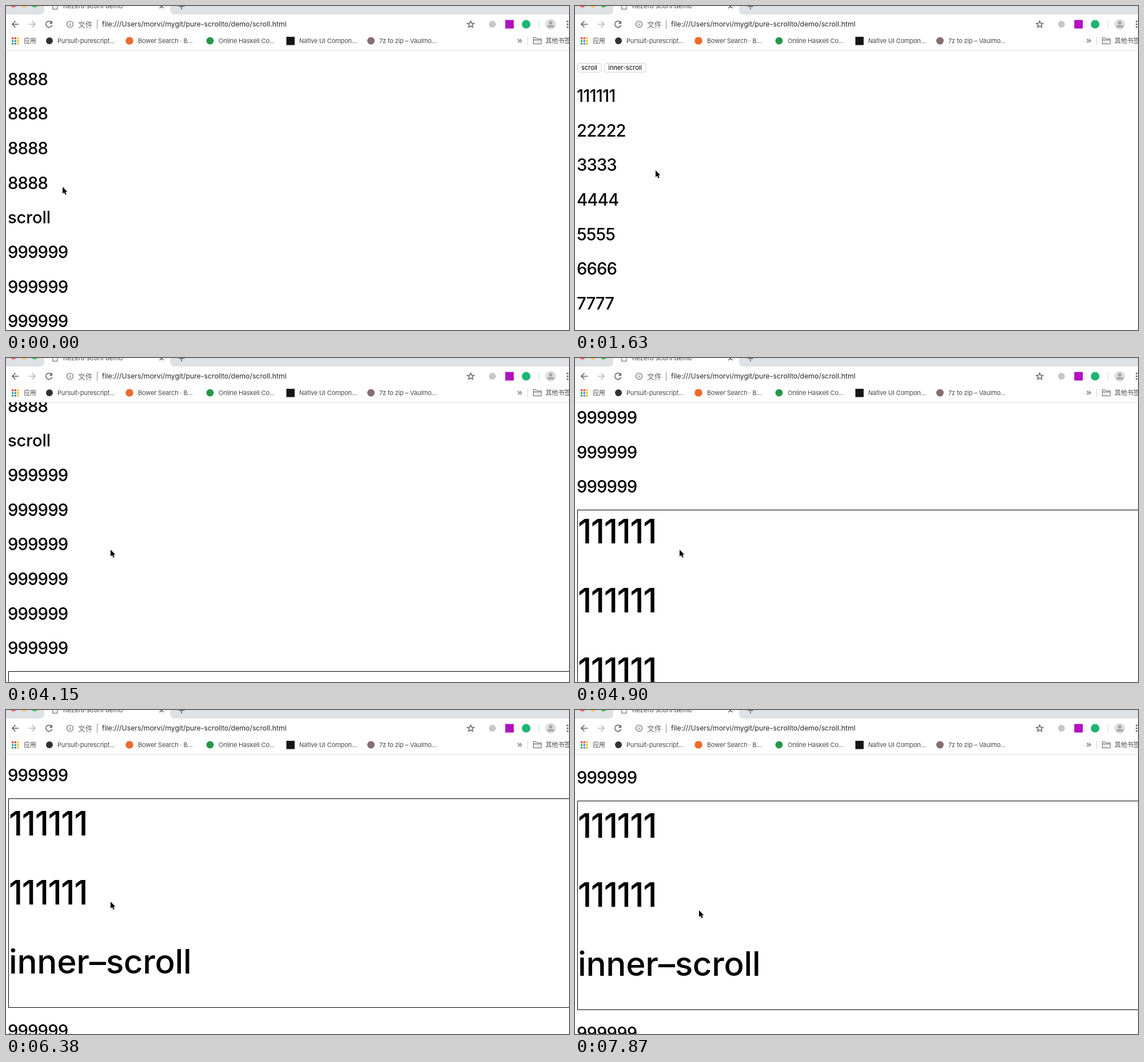
These frames come from a looping animation (985 by 568 pixels, 8000 ms). An HTML page:

```html
<!DOCTYPE html>
<html lang="zh">
<head>
<meta charset="utf-8">
<title>Scroll demo</title>
<style>
  html, body { margin: 0; width: 100%; height: 100%; overflow: hidden; background: #fff; }
  svg { display: block; font-family: Inter, "Noto Sans CJK SC", "Noto Sans CJK", sans-serif; }
  .row { font-size: 29.2px; font-weight: 550; letter-spacing: -.029em; }
  .inner { font-size: 58.4px; font-weight: 550; letter-spacing: -.024em; }
  .word { letter-spacing: -.004em; }
  .button { font-size: 11px; text-anchor: middle; }
  .mark { font-size: 11px; letter-spacing: -.015em; fill: #46494d; }
  .line { fill: none; stroke: #5f6368; stroke-width: 1.6; }
  .thin { fill: none; stroke: #5f6368; stroke-width: 1.2; }
</style>
</head>
<body>
<svg width="985" height="568" viewBox="0 0 985 568">
  <g id="page">
    <g id="buttons" fill="#fff" stroke="#d0d0d0">
      <rect x="4.5" y="100.5" width="41.5" height="15.5" rx="3"/>
      <rect x="51.5" y="100.5" width="72.5" height="15.5" rx="3"/>
    </g>
    <text class="button" x="25" y="112">scroll</text>
    <text class="button" x="87.7" y="112">inner-scroll</text>
    <g id="rows"></g>
    <rect x="4.5" y="1229.5" width="1000" height="366" fill="none" stroke="#000"/>
    <svg x="5" y="1230" width="995" height="365">
      <g id="inner">
        <rect id="selection" height="81" fill="#b4d5fe"/>
      </g>
    </svg>
  </g>

  <g id="browser">
    <rect width="985" height="78" fill="#fff"/>
    <rect width="985" height="15" fill="#dee1e6"/>
    <path d="M59 15q8 0 8-8V-5H287V7q0 8 8 8z" fill="#fff"/>
    <circle cx="13" cy="-3.5" r="6" fill="#fc5753"/>
    <circle cx="31.5" cy="-3.5" r="6" fill="#fdbc40"/>
    <circle cx="50" cy="-3.5" r="6" fill="#33c748"/>
    <path class="thin" d="M82-6V5.5h8V-6"/>
    <text x="100" y="4" font-size="11.5" fill="#46494d">Rezero scorll demo</text>
    <path class="line" d="M268.5-3l7 7M275.5-3l-7 7M301.5 .5h11M307-5V6"/>

    <path class="line" d="M22 32H11M16.5 26.5L11 32l5.5 5.5"/>
    <path class="line" d="M40 32H51M45.5 26.5L51 32l-5.5 5.5" style="stroke:#babcbe"/>
    <path class="line" d="M79.5 28.5A5.5 5.5 0 1 0 80.5 33.5"/>
    <path d="M81 25.5v5.5h-5.5z" fill="#5f6368"/>
    <circle class="thin" cx="112" cy="32" r="5.5"/>
    <path class="thin" d="M112 31v4M112 28.5v1.3"/>
    <text x="126" y="36.5" font-size="12.8" fill="#5f6368">文件</text>
    <path d="M159.5 24v16" stroke="#8b8e92"/>
    <text x="168" y="36.3" font-size="12.3" fill="#27292c">file:///Users/morvi/mygit/pure-scrollto/demo/scroll.html</text>
    <path id="star" class="thin" style="stroke-width:1.4"/>
    <circle cx="851" cy="32" r="6" fill="#c4c6c8"/>
    <rect x="873.5" y="24.5" width="15" height="15" fill="#b010c0"/>
    <circle cx="910" cy="32" r="7.5" fill="#1fb573"/>
    <path d="M932.5 24v16M912.5 54v14" stroke="#d5d7da"/>
    <circle cx="953" cy="32" r="9.3" fill="#dadce0"/>
    <circle cx="953" cy="29.5" r="3" fill="#a3a6aa"/>
    <path d="M947 37.5v-1q0-3 6-3t6 3v1z" fill="#a3a6aa"/>
    <g fill="#5f6368">
      <circle cx="982.5" cy="27" r="1.6"/><circle cx="982.5" cy="32" r="1.6"/><circle cx="982.5" cy="37" r="1.6"/>
    </g>

    <g id="apps"></g>
    <circle cx="76" cy="61" r="6" fill="#333"/>
    <circle cx="216" cy="61" r="6.8" fill="#ee6b2d"/>
    <circle cx="357" cy="61" r="6.5" fill="#24994c"/>
    <rect x="490.5" y="54" width="14.5" height="14.5" fill="#151515"/>
    <circle cx="638.5" cy="61" r="6.5" fill="#85706f"/>
    <g id="marks"></g>
    <path class="thin" d="M895.5 58l3 3-3 3M899 58l3 3-3 3"/>
    <path d="M922.5 66.5v-11h5l2 2h7v9zM922.5 59.5h14" fill="#e8e8e8" stroke="#6a6d71"/>
    <path d="M0 77.5h985" stroke="#dcdee0"/>
  </g>

  <g id="pointer">
    <path id="arrow" d="M0 0V12l2.700-2.500 2 4.500 2-.9-1.900-4.300H8.300z" stroke="#fff" stroke-width="1.2" paint-order="stroke"/>
    <path id="beam" d="M-3-8q3 0 3 2V6q0 2-3 2M3-8q-3 0-3 2M3 8q-3 0-3-2" fill="none" stroke="#222" stroke-width="1.2"/>
  </g>
</svg>
<script>
const $ = id => document.getElementById(id);
const add = (id, markup) => $(id).insertAdjacentHTML('beforeend', markup);
const text = (cls, x, y, s) => `<text class="${cls}" x="${x}" y="${y}">${s}</text>`;
const heading = (cls, x, y, s) => text(isNaN(s) ? cls + ' word' : cls, x, y, s);

const PITCH = 60.67, INNER_ROWS = 7;
const rows = ['111111', '22222', '3333', '4444', '5555', '6666', '7777',
  ...Array(4).fill('8888'), 'scroll', ...Array(6).fill('999999')];
rows.forEach((s, i) => add('rows', heading('row', 3, 168 + PITCH * i, s)));
add('rows', heading('row', 3, 1646.5, '999999'));

const innerBaseline = i => 101 + 2 * PITCH * i;
for (let i = 0; i <= INNER_ROWS; i++)
  add('inner', heading('inner', 0, innerBaseline(i), i < INNER_ROWS ? '111111' : 'inner–scroll'));
const innerEnd = innerBaseline(INNER_ROWS) - 306.5;
$('selection').setAttribute('y', innerBaseline(INNER_ROWS) - 62);

const colors = ['#ea4335', '#ea4335', '#fbbc05', '#34a853', '#4285f4', '#fbbc05', '#34a853', '#4285f4', '#fbbc05'];
colors.forEach((c, i) => add('apps',
  `<rect x="${10 + i % 3 * 4.7}" y="${55 + (i / 3 | 0) * 4.7}" width="3.2" height="3.2" fill="${c}"/>`));
[[31, '应用'], [90, 'Pursuit-purescript...'], [231, 'Bower Search · B...'], [372, 'Online Haskell Co...'],
  [513, 'Native UI Compon...'], [653, '7z to zip – Vaulmo...'], [944, '其他书签']]
  .forEach(([x, s]) => add('marks', text('mark', x, 65, s)));

const starPoints = Array.from({ length: 10 }, (_, i) => {
  const r = i % 2 ? 2.7 : 6.3, a = i * Math.PI / 5;
  return `${813 + r * Math.sin(a)} ${32.4 - r * Math.cos(a)}`;
});
$('star').setAttribute('d', `M${starPoints.join('L')}z`);

const LOOP = 8000, LAST_TICK = 53, SHORT_TICKS = [3, 7, 24, 25, 26, 35, 41, 50];
function tickAt(time) {
  let tick = 0;
  while (tick < LAST_TICK && (time -= SHORT_TICKS.includes(tick) ? 140 : 150) >= 0) tick++;
  return tick;
}

// Keys are [tick, value, ...], joined by straight lines.
const scrollKeys = [[0, 454], [6, 454], [7, 410], [9, 90], [10, -8], [11, 0], [12, 6], [14, 10], [18, 10],
  [19, 483], [20, 454], [26, 454], [27, 520], [28, 680], [29, 963], [39, 963],
  [40, 1076], [41, 1081], [43, 1074], [46, 1070]];
const innerKeys = [[30, 0], [32, 70], [37, innerEnd - 102], [38, innerEnd]];
const pointerKeys = [[0, 99, 317], [2, 45, 358], [3, 45, 358], [6, 145, 289], [10, 145, 289], [11, 141, 288],
  [17, 22, 97], [21, 22, 97], [27, 183, 336], [43, 183, 336], [46, 322, 440], [47, 322, 440],
  [50, 8, 440], [51, 8, 440], [53, 217, 351]];

function sample(keys, tick) {
  const next = keys.findIndex(k => k[0] >= tick);
  if (next < 0) return keys.at(-1).slice(1);
  if (next === 0) return keys[0].slice(1);
  const [a, b] = [keys[next - 1], keys[next]];
  const f = (tick - a[0]) / (b[0] - a[0]);
  return a.slice(1).map((v, i) => v + (b[i + 1] - v) * f);
}

const move = (id, x, y) => $(id).setAttribute('transform', `translate(${x} ${y})`);
const show = (id, on) => $(id).setAttribute('visibility', on ? 'visible' : 'hidden');

function draw(now) {
  const tick = tickAt(now % LOOP);
  const [x, y] = sample(pointerKeys, tick);
  move('page', 0, -Math.round(sample(scrollKeys, tick)[0]));
  move('inner', 0, -sample(innerKeys, tick)[0]);
  move('pointer', Math.round(x), Math.round(y));

  const overText = tick >= 46 && tick <= 51;
  show('beam', overText);
  show('arrow', !overText);

  const left = tick > 50 ? 0 : Math.max(0, x - 5);
  $('selection').setAttribute('x', left);
  $('selection').setAttribute('width', 323 - left);
  show('selection', tick >= 48 && tick <= 52);
}

const start = performance.now();
(function loop() {
  draw(performance.now() - start);
  requestAnimationFrame(loop);
})();
</script>
</body>
</html>
```
